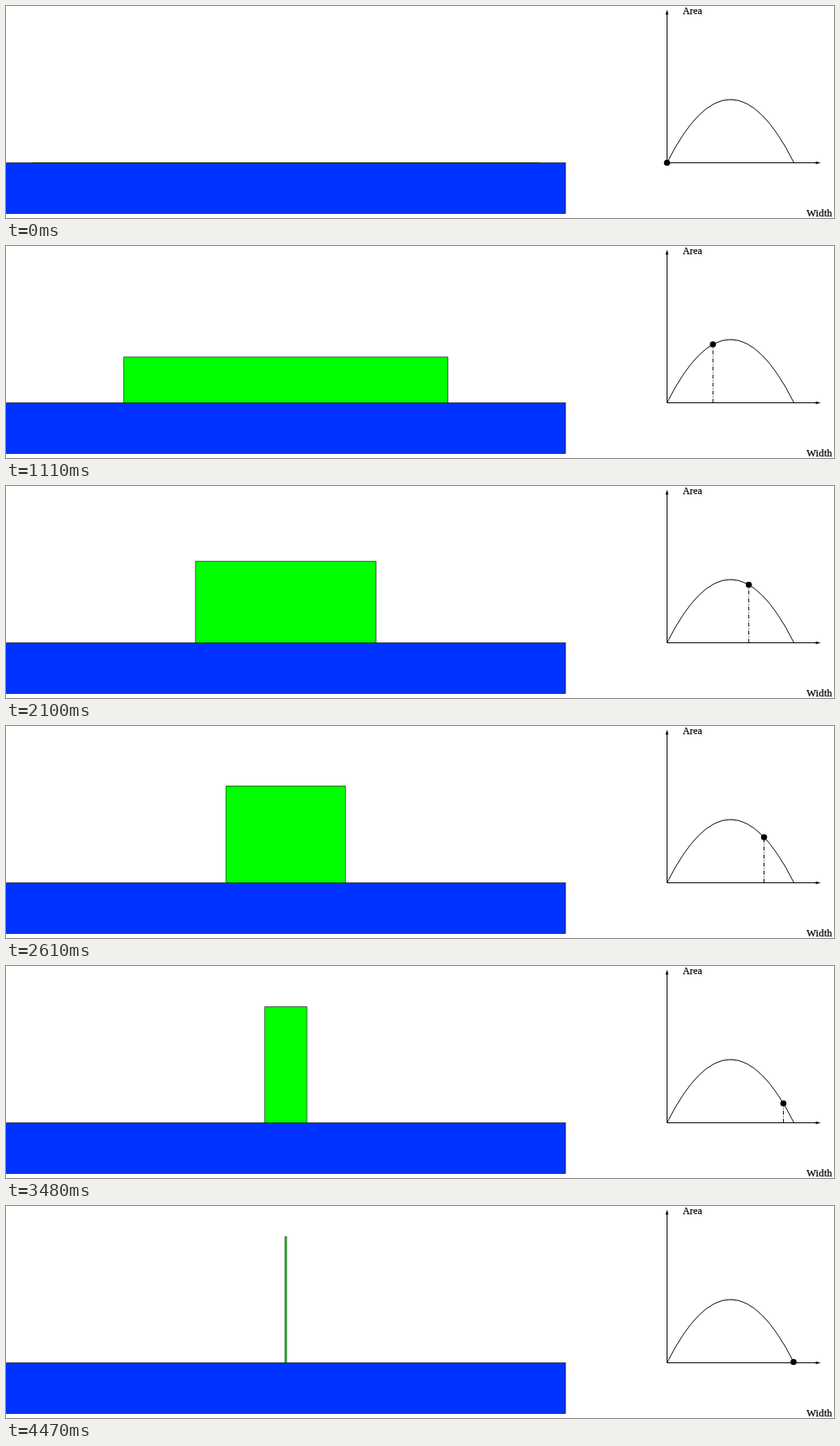
Animation, 1024 px wide and 263 px high, one loop 4.5 s. Source, as an HTML page:

```html
<!DOCTYPE html>
<html lang="en">
<head>
<meta charset="utf-8">
<title>Area against width</title>
<style>
  html, body { margin: 0; width: 100%; height: 100%; overflow: hidden; background: #fff; }
  svg { display: block; width: 100vw; height: 100vh; }
  text { font: 12px "Liberation Serif", "Times New Roman", serif; letter-spacing: .15px; stroke: #000; stroke-width: .25; }
  .thin { stroke: #000; stroke-width: .6; }
  .line { fill: none; stroke: #000; stroke-width: 1; }
</style>
</head>
<body>
<svg viewBox="0 0 1024 263" xmlns="http://www.w3.org/2000/svg">
  <rect class="thin" x="-2" y="194.5" width="694" height="63" fill="#03f"/>
  <rect id="field" fill="#0f0"/>
  <path id="edge" class="thin" fill="none"/>
  <path class="line" d="M817.5 194.5V8M817.5 194.5H1004"/>
  <path d="M817.5 4.5l1.8 6h-3.6zM1007.5 194.5l-6 -1.8v3.6z"/>
  <path id="curve" class="line" stroke-width="1.2"/>
  <path id="drop" class="line" stroke-dasharray="5 2 1 2"/>
  <circle id="dot" r="3.8"/>
  <text x="837" y="10">Area</text>
  <text x="990" y="261" style="font-size:12.6px">Width</text>
</svg>
<script>
  const LOOP = 4500, STEP = 30, MAX = 157;
  const BASE = 194.5, AXIS = 817.5, MID = 346;
  const el = id => document.getElementById(id);
  const set = (id, attrs) => {
    for (const key in attrs) el(id).setAttribute(key, attrs[key]);
  };
  const area = w => 2 * w * (MAX - w) / MAX;

  // The control point of a parabola lies at twice its height.
  set('curve', { d: `M${AXIS} ${BASE}q${MAX / 2} ${-MAX} ${MAX} 0` });

  function draw(time) {
    const step = Math.floor((time % LOOP) / STEP);
    const w = MAX * Math.sin(step / 100);
    const half = 2 * (MAX - w);
    const left = MID - half, top = BASE - w;
    const x = AXIS + w, y = BASE - area(w);

    set('field', { x: left, y: top - (w ? 0 : .4), width: 2 * half, height: Math.max(w, .8) });
    set('edge', { d: `M${left} ${BASE}V${top}H${MID + half}V${BASE}Z` });
    set('drop', { d: `M${x} ${BASE}V${y}` });
    set('dot', { cx: x, cy: y });
  }

  const start = performance.now();
  function tick() {
    draw(performance.now() - start);
    requestAnimationFrame(tick);
  }
  draw(0);
  requestAnimationFrame(tick);
</script>
</body>
</html>
```
